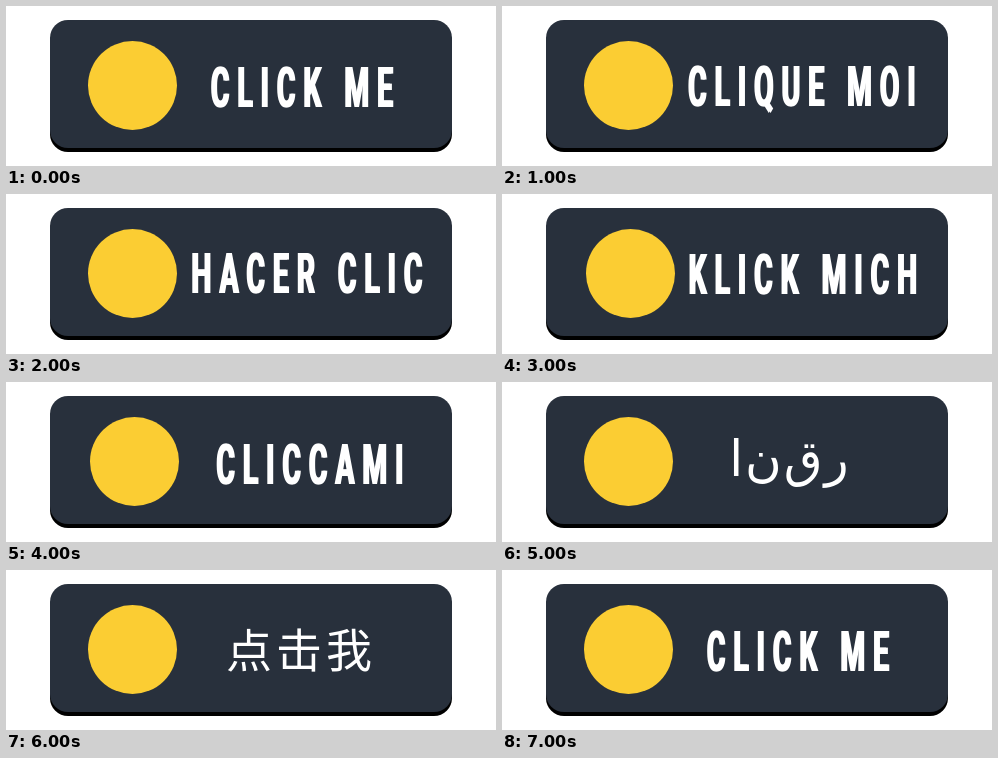
An HTML page for the animation above (8000 ms loop, 490 by 160 pixels).

```html
<!DOCTYPE html>
<html lang="en">
<head>
<meta charset="utf-8">
<title>Click me button</title>
<style>
  html, body { margin: 0; width: 100%; height: 100%; overflow: hidden; background: #fff; }
  #button {
    position: absolute; left: 44px; top: 14px; width: 402px; height: 128px;
    border-radius: 18px; background: #28303c; box-shadow: 0 4px #000;
  }
  #badge {
    position: absolute; top: 35px; width: 89px; height: 89px;
    border-radius: 50%; background: #fbcd33;
  }
  #label {
    position: absolute; color: #fff; white-space: nowrap;
    transform: translateX(-50%) scaleX(var(--condense, 1));
  }
  /* Condensed poster lettering: narrow caps with stems thickened sideways */
  .latin {
    --condense: .505;
    font: bold 56px/58px Roboto, sans-serif; letter-spacing: 15.8px;
    text-shadow: 3.6px 0 #fff; margin-left: 3px;
  }
  .arabic {
    font: 50px/58px "DejaVu Sans", sans-serif; letter-spacing: 2px;
    direction: ltr; unicode-bidi: bidi-override;
  }
  .chinese { font: 46px/58px "Noto Sans CJK SC", "Noto Sans CJK", sans-serif; letter-spacing: 4px; }
</style>
</head>
<body>
<div id="button"></div>
<div id="badge"></div>
<div id="label"></div>
<script>
const STEP = 1000;
const label = document.getElementById("label");
const badge = document.getElementById("badge");

const word = (text, x, top, badgeX = 81.5, script = "latin") => ({ text, x, top, badgeX, script });
const clickMe = word("CLICK ME", 295.5, 53);

// One entry per second
const words = [
  clickMe,
  word("CLIQUE MOI", 300, 52),
  word("HACER CLIC", 301, 51),
  word("KLICK MICH", 300.5, 51.5, 83.5),
  word("CLICCAMI", 303.5, 54, 83.5),
  word([..."انقر"].join("\u200c"), 288, 48, 81.5, "arabic"),
  word("点击我", 295, 48, 81.5, "chinese"),
  clickMe
];

let shown;
function draw() {
  const next = words[Math.floor(performance.now() / STEP) % words.length];
  if (next !== shown) {
    shown = next;
    label.textContent = next.text;
    label.className = next.script;
    label.style.left = next.x + "px";
    label.style.top = next.top + "px";
    badge.style.left = next.badgeX + "px";
  }
  requestAnimationFrame(draw);
}
draw();
</script>
</body>
</html>
```
